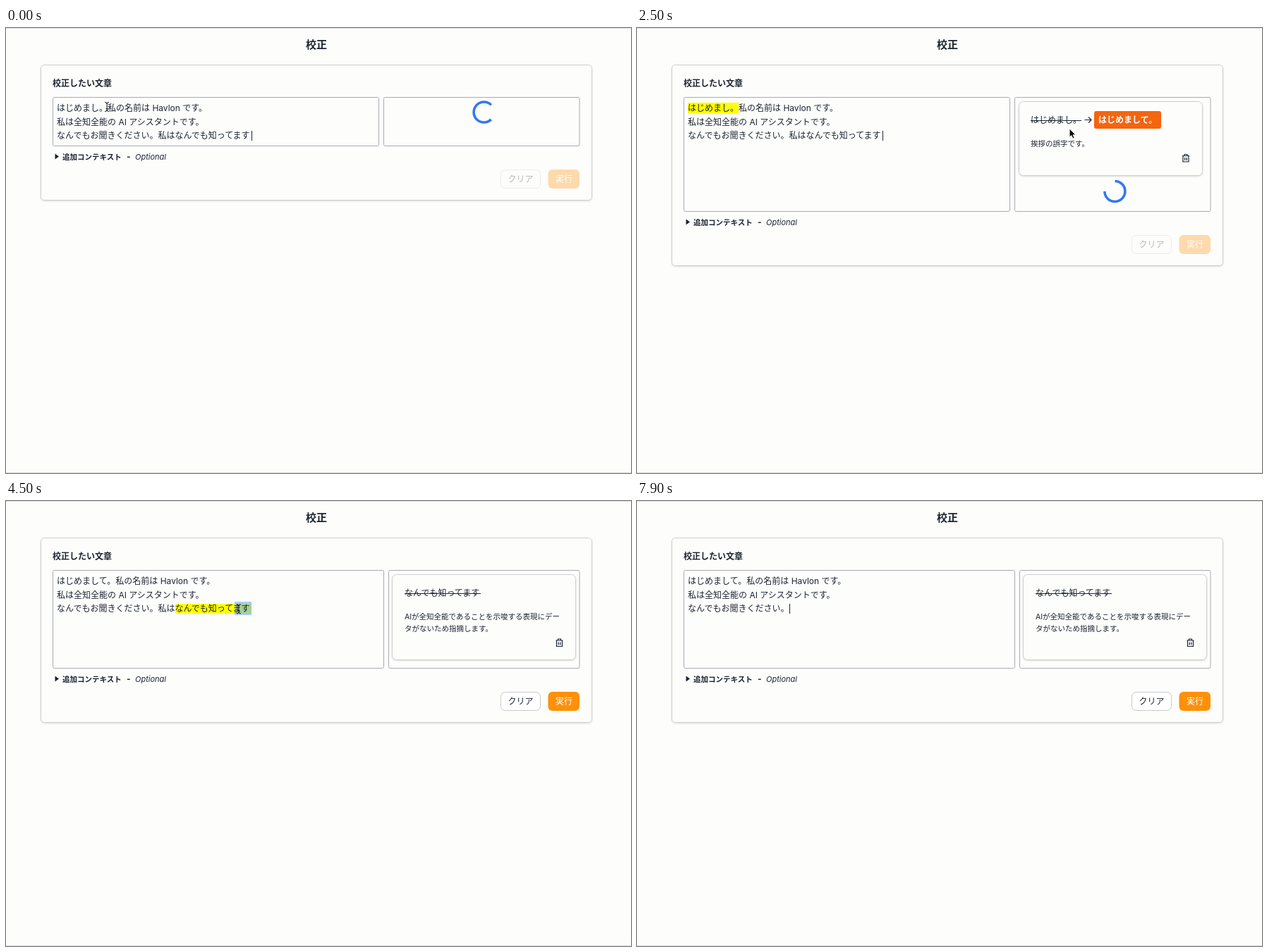
An HTML page that plays this animation: 886 by 632 pixels, repeating every 8 s.

```html
<!DOCTYPE html>
<html lang="ja">
<head>
<meta charset="utf-8">
<title>校正</title>
<style>
  html, body { margin: 0; width: 100%; height: 100%; overflow: hidden; background: #fdfdfc; }
  svg { display: block; width: 886px; height: 632px; }
  text { font: 12px Inter, "Noto Sans CJK JP", sans-serif; fill: #1c2430; white-space: pre; }
  .bold { font-weight: 700; }
  .small { font-size: 10.5px; }
  .box { fill: #fdfdfc; stroke: #a9abb2; }
  .card { fill: #fdfdfc; stroke: #cfcfcd; filter: drop-shadow(0 1px 1px #0002); }
  .mark { fill: #ff0; }
  .icon { fill: none; stroke: #1c2430; stroke-width: 1.2; }
</style>
</head>
<body>
<svg viewBox="0 0 886 632">
  <path d="M0 .5H886M0 631.5H886" stroke="#dcdcdc"/>
  <text class="bold" x="440" y="29" text-anchor="middle" style="font-size:15px">校正</text>
  <rect id="panel" class="card" x="49.5" y="52.5" width="781" rx="5"/>
  <text class="bold" x="66" y="82.5">校正したい文章</text>

  <rect id="left" class="box" x="66.5" y="98.5" rx="2"/>
  <rect id="right" class="box" y="98.5" rx="2"/>
  <rect id="markA" class="mark" x="72" y="106" width="72" height="15"/>
  <rect id="markB" class="mark" x="240" y="146" width="108" height="14"/>
  <rect id="selection" y="143" height="19" fill="rgba(111,175,245,.6)"/>
  <text id="line1" x="72" y="118"></text>
  <text x="72" y="137.5">私は全知全能の AI アシスタントです。</text>
  <text id="line3" x="72" y="157"></text>
  <path id="caret" stroke="#1c2430"/>

  <g id="cardA">
    <rect class="card" x="541.5" y="104.5" width="260" height="105" rx="6"/>
    <text x="558" y="135">はじめまし。</text>
    <path d="M558 131.5h72" stroke="#1c2430"/>
    <path class="icon" d="M634.5 130.5h9.5m-4-4 4 4-4 4"/>
    <rect x="648" y="118" width="95" height="25" rx="3" fill="#f5640f"/>
    <text class="bold" x="654" y="135" style="fill:#fff">はじめまして。</text>
    <text class="small" x="558" y="168">挨拶の誤字です。</text>
    <use href="#trash" x="778" y="185"/>
  </g>
  <g id="cardB">
    <rect class="card" x="547.5" y="104.5" width="260" height="121" rx="6"/>
    <text x="565" y="135">なんでも知ってます</text>
    <path d="M565 131.5h108" stroke="#1c2430"/>
    <text class="small" x="565" y="168">AIが全知全能であることを示唆する表現にデー</text>
    <text class="small" x="565" y="184.5">タがないため指摘します。</text>
    <use href="#trash" x="784.5" y="201.5"/>
  </g>
  <path id="spinner" d="M10.3 10.3A14.5 14.5 0 1 1 10.3-10.3" fill="none" stroke="#3478ee" stroke-width="3.6"/>

  <g id="footer">
    <path d="M69.5 178.5v8l5.5-4z" fill="#1c2430"/>
    <text class="bold small" x="80" y="186.5">追加コンテキスト</text>
    <text class="bold" x="171" y="186.5">-</text>
    <text x="183" y="186.5" style="font-style:italic;font-size:11px">Optional</text>
    <g id="buttons">
      <rect x="701.5" y="201.5" width="56" height="26" rx="6" fill="#fff" stroke="#c9c9cc"/>
      <text x="711.5" y="219">クリア</text>
      <rect x="768.5" y="201" width="44.5" height="27" rx="6" fill="#ff9008"/>
      <text x="779" y="219" style="fill:#fff;font-weight:500">実行</text>
    </g>
  </g>

  <g id="cursor">
    <path id="beam" d="M-3-6.5Q0-6.5 0-4.5Q0-6.5 3-6.5M0-5V5M-3 6.5Q0 6.5 0 4.5Q0 6.5 3 6.5M-1.5 2.5h3" fill="none" stroke="#111"/>
    <path id="arrow" d="M0 0V12L2.8 9.6 4.8 14 6.8 13 4.9 8.8H8.5Z" fill="#000" stroke="#fff" stroke-width=".8"/>
    <path id="hand" d="M-1 0Q0-1 1 0V5L6 6Q8 7 7 10L6 14H-1L-5 8Q-4 6-1 9Z" fill="#fff" stroke="#000"/>
  </g>
  <defs>
    <path id="trash" class="icon" d="M-5-3.5H5M-2-3.5V-5.5H2V-3.5M-4-3.5V5H4V-3.5M-1.3-1V3M1.3-1V3"/>
  </defs>
</svg>
<script>
const LOOP = 8000, CARD_A = 2100, CARD_B = 2600, APPLIED = 3700, SELECT = 4450, DELETED = 7100;
const el = Object.fromEntries([...document.querySelectorAll('[id]')].map(e => [e.id, e]));

// time, x, y
const pointer = [[0, 143, 112], [1300, 265, 125], [1900, 535, 140], [2500, 613, 143], [3000, 694, 121],
  [3800, 694, 121], [4400, 352, 153], [5200, 177, 155], [5700, 177, 155], [6300, 210, 159], [6700, 215, 158]];
// time, gap angle
const spin = [[0, 0], [1300, 438], [2500, 945], [2600, 985]];

const set = (id, attrs) => { for (const k in attrs) el[id].setAttribute(k, attrs[k]); };
const show = (id, on) => { el[id].style.display = on ? '' : 'none'; };
const write = (id, s) => { if (el[id].textContent !== s) el[id].textContent = s; };

function at(keys, t, col) {
  const i = keys.findIndex(k => k[0] > t);
  if (i < 0) return keys.at(-1)[col];
  const a = keys[i - 1], b = keys[i];
  return a[col] + (b[col] - a[col]) * (t - a[0]) / (b[0] - a[0]);
}

function draw(t) {
  const loading = t < CARD_B, applied = t >= APPLIED, deleted = t >= DELETED;
  const split = loading ? 528 : 535;
  const bottom = t < CARD_A ? 167 : loading ? 260 : applied ? 237 : 349;

  set('panel', { height: bottom + 78 - 53 });
  set('left', { width: split - 66, height: bottom - 98 });
  set('right', { x: split + 7.5, width: 806 - split - .5, height: bottom - 98 });
  set('footer', { transform: `translate(0 ${bottom - 167})` });
  set('buttons', { opacity: loading ? .32 : 1 });

  show('cardA', t >= CARD_A && !applied);
  set('cardA', { transform: `translate(${loading ? 0 : 6} 0)` });
  show('cardB', !loading);
  set('cardB', { transform: `translate(0 ${applied ? 0 : 111})` });
  show('spinner', loading);
  set('spinner', { transform: `translate(677.5 ${t < CARD_A ? 119.5 : 232}) rotate(${at(spin, t, 1)})` });

  write('line1', `はじめまし${applied ? 'て' : ''}。私の名前は Havlon です。`);
  write('line3', 'なんでもお聞きください。' + (deleted ? '' : '私はなんでも知ってます'));
  show('markA', t >= CARD_A && !applied);
  show('markB', !loading && !deleted);

  const x = at(pointer, t, 1), y = at(pointer, t, 2);
  const start = Math.min(348, 72 + 12 * Math.round((x - 72) / 12 - .1));
  show('selection', t >= SELECT && !deleted);
  set('selection', { x: start, width: 348 - start });
  show('caret', deleted || !applied && t % 1067 < 533);
  set('caret', { d: `M${deleted ? 216.5 : 348.5} 146v14` });

  const beam = x < split, hand = !beam && !loading && !applied && x > 654 && y < 143;
  show('cursor', !deleted);
  set('cursor', { transform: `translate(${x} ${y})` });
  show('beam', beam);
  show('hand', hand);
  show('arrow', !beam && !hand);
}

const origin = performance.now();
function tick() {
  draw((performance.now() - origin) % LOOP);
  requestAnimationFrame(tick);
}
tick();
</script>
</body>
</html>
```
